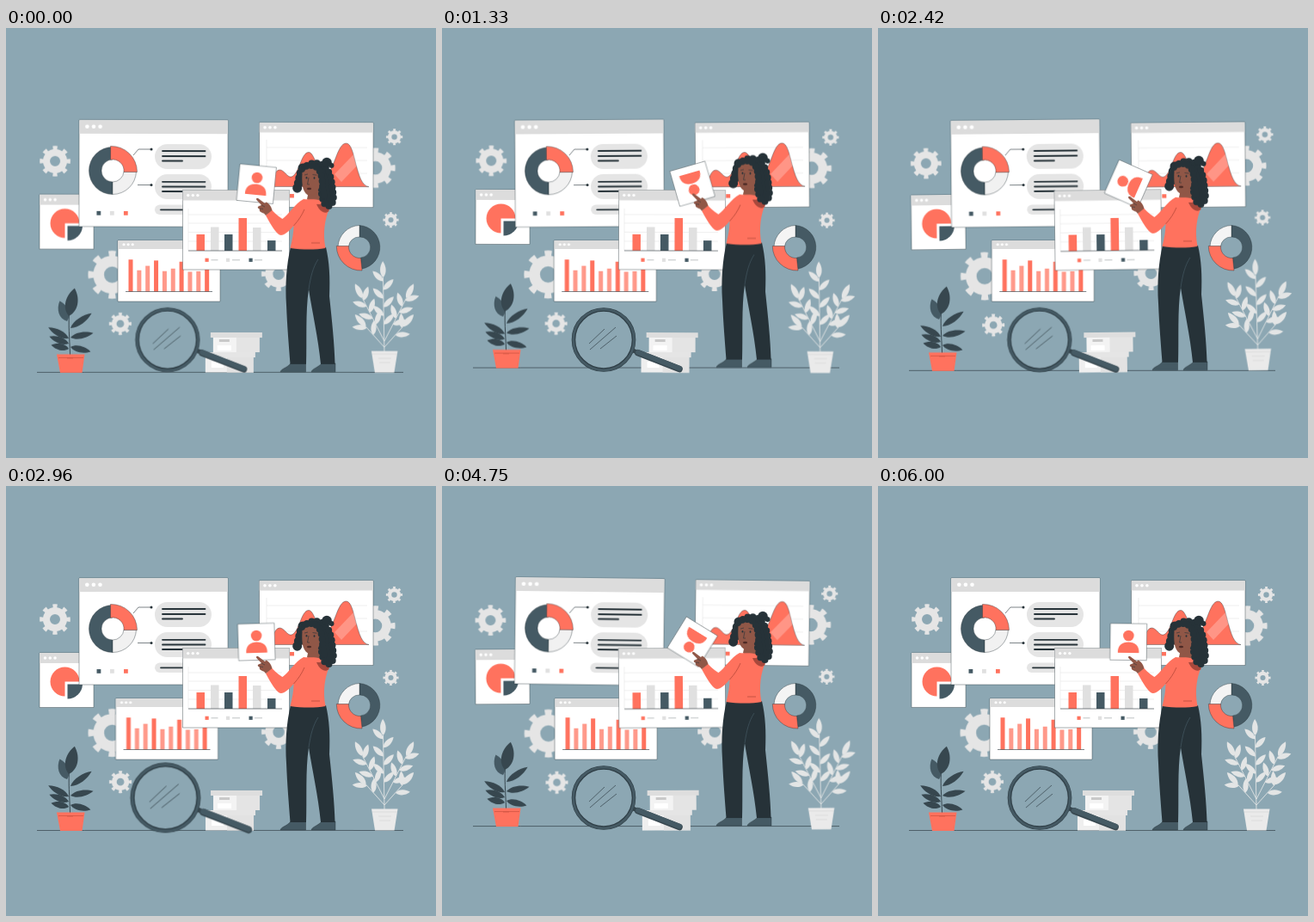
Write an HTML page that moves like this. It is 500x500 px and loops after 6040 ms.

```html
<!DOCTYPE html>
<html lang="en">
<head>
<meta charset="utf-8">
<title>Data dashboard</title>
<style>
  html, body { margin: 0; width: 100%; height: 100%; overflow: hidden; background: #8ca7b3; }
  svg { display: block; width: 100vw; height: 100vh; }

  .wind, .swing, .float, .spin, .shake, .pulse, .ends {
    transform-box: view-box;
    animation: wind 3.02s linear -45ms infinite;
  }
  .wind { transform-origin: 250px 250px; }
  .quick { animation-duration: 1.51s; }
  .float { animation-name: float; }
  .spin { animation-name: spin; transform-origin: 291.2px 181.2px; }
  .shake { animation-name: shake; animation-duration: 6.04s; }
  .pulse { animation-name: pulse; animation-duration: 6.04s; transform-origin: 215px 362.5px; }
  .ends { animation-name: ends; }

  @keyframes wind {
    0%, 100% { transform: rotate(0deg); }
    25% { transform: rotate(1deg); }
    75% { transform: rotate(-1deg); }
  }
  @keyframes float {
    0%, 100% { transform: translateY(0); }
    50% { transform: translateY(-6px); }
  }
  @keyframes spin { to { transform: rotate(360deg); } }
  @keyframes shake {
    0%, 100% { transform: translateX(0); }
    10%, 90% { transform: translateX(-.67px); }
    20%, 80% { transform: translateX(1.33px); }
    30%, 50%, 70% { transform: translateX(-2.67px); }
    40%, 60% { transform: translateX(2.67px); }
  }
  @keyframes pulse {
    0%, 20%, 40%, 60%, 100% { transform: scale(1); }
    10%, 50% { transform: scale(1.1); }
  }
  @keyframes ends {
    0%, 15% { opacity: 1; }
    15.01%, 45% { opacity: 0; }
    45.01%, 100% { opacity: 1; }
  }

  .red { fill: #ff725e; }
  .slate { fill: #455a64; }
  .dark { fill: #263238; }
  .grey { fill: #e0e0e0; }
  .bar { fill: #dcdcdc; }
  .white { fill: #fff; }
  .skin { fill: #905747; }
  .edge { stroke: #263238; stroke-width: .5; stroke-opacity: .8; }
  .line { fill: none; stroke: #263238; stroke-width: .6; }
  .grid { fill: none; stroke: #e4e4e4; stroke-width: .6; }
  .text { fill: none; stroke: #263238; stroke-width: 1.8; stroke-linecap: round; }
  .curly { stroke: #263238; stroke-width: 8; stroke-linecap: round; stroke-dasharray: 0 6; }
</style>
</head>
<body>
<svg viewBox="0 0 500 500">
  <defs>
    <g id="gear" fill="none" stroke="#e5e5e5">
      <circle r="10" stroke-width="8"/>
      <circle r="15" stroke-width="5.6" pathLength="16" stroke-dasharray=".85 1.15" stroke-dashoffset=".42"/>
    </g>
    <path id="leaf" d="M0 0C-.6 -.25 -.5 -.7 0 -1C.5 -.7 .6 -.25 0 0Z"/>
    <g id="dots" class="white"><circle r="1"/><circle cx="3.3" r="1"/><circle cx="6.6" r="1"/></g>
  </defs>

  <g class="wind">
    <use href="#gear" transform="translate(57 155)"/>
    <use href="#gear" transform="translate(123.500 287) scale(1.57)"/>
    <use href="#gear" transform="translate(429.500 162.500) scale(1.3)"/>
    <use href="#gear" transform="translate(317 286) scale(1.12)"/>
    <use href="#gear" transform="translate(451.500 126.500) scale(.54)"/>
    <use href="#gear" transform="translate(447.500 223) scale(.51)"/>
    <use href="#gear" transform="translate(133 344) scale(.73)"/>
  </g>

  <!-- pie window -->
  <g class="float"><g class="wind">
    <path class="white edge" d="M39 194H102V257.500H39Z"/>
    <path class="bar" d="M39 194H102V206H39Z"/>
    <use href="#dots" transform="translate(45.500 200) scale(1.75)"/>
    <path class="red" d="M68.500 227.500V244.500A17 17 0 1 1 85.500 227.500Z"/>
    <path class="slate" d="M71.500 230.500H89A17.500 17.500 0 0 1 71.500 247.500Z"/>
  </g></g>

  <!-- report window -->
  <g class="swing quick" style="transform-origin:171.500px 169px">
    <path class="white edge" d="M85 107H258V231H85Z"/>
    <path class="bar" d="M85.200 107.200H257.800V123H85.200Z"/>
    <use href="#dots" transform="translate(94.300 114.700) scale(2.3)"/>
    <path class="slate edge" d="M124 138.500A27.500 27.500 0 0 0 124 193.500V179A13 13 0 0 1 124 153Z"/>
    <path fill="#f1f1f1" class="edge" d="M124 193.500A27.500 27.500 0 0 0 151.500 167H137A13 13 0 0 1 124 179Z"/>
    <path class="red edge" d="M121.500 137.500A30 30 0 0 1 152.500 167.500H137A13 13 0 0 0 121.500 153.200Z"/>
    <path class="line" d="M148 148L154 141H168M153 182.500H168"/>
    <circle class="dark" cx="169" cy="141" r="1.500"/><circle class="dark" cx="169" cy="182.500" r="1.500"/>
    <g fill="#e5e5e5">
      <rect x="173" y="135" width="66" height="29" rx="14.500"/>
      <rect x="173" y="170" width="66" height="29" rx="14.500"/>
      <rect x="173" y="205.500" width="66" height="11.500" rx="5.700"/>
    </g>
    <path class="text" d="M182 143H231.500M182 149H231.500M182 154.500H205M182 178.800H231.500M182 184.500H231.500M182 190H205M180 211.300H220"/>
    <path class="slate" d="M105.500 213h4.800v4.800h-4.800z"/>
    <path class="grey" d="M121 213h4.800v4.800h-4.800z"/>
    <path class="red" d="M137 213h4.800v4.800h-4.800z"/>
  </g>

  <!-- trend window -->
  <g class="swing quick" style="transform-origin:360.500px 159px">
    <path class="white edge" d="M294.500 110H427V208.500H294.500Z"/>
    <path class="bar" d="M294.700 110.200H426.800V121.500H294.700Z"/>
    <use href="#dots" transform="translate(301 115.800) scale(1.8)"/>
    <path class="grid" d="M303 139H420M303 154H420M303 169H420M303 130V184"/>
    <path class="red edge" d="M303 184.500C309 184 311 165 318 165S328 178 335 171S344 144.500 352 144.500S364 178 372 172C382 165 385 134 395.500 134C407 134 406 183 422 184.500Z"/>
    <path fill="#fff" opacity=".25" d="M382 170L406 145L409 159L390 179Z"/>
    <path class="red" d="M330 193h5v4.500h-5z"/>
  </g>

  <!-- right donut -->
  <g class="edge">
    <path class="slate" d="M411 229.500A25.500 25.500 0 0 1 414 280L412.500 267A12 12 0 0 0 411 243Z"/>
    <path fill="#f4f4f4" d="M411 229.500A26 26 0 0 0 386 254H398.500A12 12 0 0 1 411 243Z"/>
    <path class="red" d="M384.300 253.500A28.500 28.500 0 0 0 414 282L412.500 267.500A13 13 0 0 1 398.500 253.500Z"/>
  </g>

  <!-- bar window -->
  <g class="shake">
    <path class="white edge" d="M130 247H249V318H130Z"/>
    <path class="bar" d="M130.200 247.200H248.800V257H130.200Z"/>
    <use href="#dots" transform="translate(137 251.800) scale(1.55)"/>
    <g id="bars" class="red"></g>
    <path class="line" d="M139 306.500H240"/>
  </g>

  <!-- column window -->
  <g class="swing" style="transform-origin:267.500px 234.500px">
    <path class="white edge" d="M205.500 188.500H329.500V281H205.500Z"/>
    <path class="bar" d="M205.700 188.700H329.300V200.500H205.700Z"/>
    <use href="#dots" transform="translate(211.700 194.600) scale(1.7)"/>
    <path class="grid" d="M212 217H321M212 227H321M212 237.500H321M212 248H321M212 210V259"/>
    <path class="red" d="M221.500 240h9.500v19h-9.500zM270.500 221h9.500v38h-9.500z"/>
    <path class="grey" d="M238 231.500h9.500V259h-9.500zM287 232h9.500v27H287z"/>
    <path class="slate" d="M254 240h9.500v19H254zM304 247h9.500v12H304z"/>
    <path class="line" d="M212 259H321"/>
    <path class="red" d="M231.500 267.700h4.200v4.200h-4.200z"/>
    <path class="grey" d="M256 267.700h4.200v4.200H256z"/>
    <path class="slate" d="M282.500 267.700h4.200v4.200h-4.200z"/>
    <path class="line" stroke-opacity=".5" d="M238.500 269.800h8M263 269.800h9M289 269.800h9"/>
  </g>

  <!-- ground -->
  <g class="float">
    <path class="line" d="M91.500 400.500H404"/>
    <path class="line ends" d="M36 400.500H91.500M404 400.500H462"/>
  </g>

  <!-- boxes -->
  <g class="wind">
    <path fill="#efefef" d="M232 377H288V400.500H232Z"/>
    <path fill="#e2e2e2" d="M257 383H288V400.500H257Z"/>
    <path fill="#e5e5e5" d="M231 377H290V383H231Z"/>
    <path fill="#f3f3f3" d="M241 359H269V377H241Z"/>
    <path fill="#e4e4e4" d="M268 359H295V377H268Z"/>
    <path fill="#dedede" d="M238 354H298V360H238Z"/>
    <path fill="#c9c9c9" d="M248 362h12v3h-12z"/>
    <path fill="#fff" d="M246 369h16v6h-16zM239 388h14v7h-14z"/>
  </g>

  <!-- magnifier -->
  <g class="pulse">
    <path d="M222 375L238 381.500" stroke="#37474f" stroke-width="5"/>
    <path d="M228 377.800L276 396.500" stroke="#37474f" stroke-width="7.600" stroke-linecap="round"/>
    <path d="M228 377L276 395.700" stroke="#455a64" stroke-width="6" stroke-linecap="round"/>
    <circle cx="188" cy="362.500" r="35" fill="#8ca7b3" stroke="#2f3e46" stroke-width="4.600"/>
    <circle cx="188" cy="362.500" r="35.300" fill="none" stroke="#455a64" stroke-width="2.800"/>
    <path class="line" d="M171 367L189 350M172 374L202 348M184 373L203 358"/>
  </g>

  <!-- right plant -->
  <g class="wind">
    <g id="pale" fill="#e3e5e5" stroke="#e3e5e5"></g>
    <path d="M425 375.500H455.500L451.500 400.500H429Z" fill="#eaeaea"/>
    <path class="grid" style="stroke:#d2d2d2" d="M426 379H455M433 384h15M434 389h13"/>
  </g>

  <!-- left plant -->
  <g class="float">
    <g id="dusk" fill="#37474f" stroke="#37474f"></g>
    <use href="#leaf" class="slate" transform="translate(71 341) rotate(-20) scale(14 25)"/>
    <use href="#leaf" fill="#37474f" transform="translate(73 335) rotate(12) scale(17 33)"/>
    <path class="red" d="M59 379.500H91.500L88.500 401H63Z"/>
    <path d="M61 383.500H90M71 384h7" fill="none" stroke="#c9513f" stroke-width=".7"/>
  </g>

  <!-- contact card -->
  <g class="spin">
    <path class="white edge" d="M270 160H312.500V202.500H270Z"/>
    <circle class="red" cx="291.300" cy="174" r="6.300"/>
    <path class="red" d="M279 194C278.500 185.500 284 181.500 291.300 181.500S304 185.500 303.500 194Z"/>
  </g>

  <!-- woman -->
  <g class="float">
    <path class="slate edge" d="M331 390H348.500V400H319C320 396 327 395.500 331 390ZM367 390H383V400H355C356 396 363 395 367 390Z"/>
    <path class="dark" d="M331 255C326 275 324.500 300 326 322C327 348 329 370 330.500 391H349C350 365 348 330 352 304C356 330 363 360 366 391H382.500C382 368 379 340 376 312C377 290 376 272 372 255Z"/>
    <path d="M352 304C354 290 357 278 363 269" fill="none" stroke="#455a64" stroke-width=".7"/>
    <path class="skin" d="M352 190L364 186L368 200L356 205L350 199Z"/>
    <path class="red" d="M346 199C356 200 368 196 376 210C371 222 368 238 371.500 256C360 258 345 258 330.500 256C333 246 334.500 238 334.500 230C327 239 321 243 317 240C311 235 306 225 302 218L309 211.500C314 217 318 220 321.500 222C329 217 336 204 346 199Z"/>
    <path d="M334.500 230C340 224 344 218 347 211M355 250h10" fill="none" stroke="#b84a3a" stroke-width=".8"/>
    <path fill="#a8483c" d="M361 205C365 214 371 217 375.500 213L376 205Z"/>
    <path class="skin" d="M302 218L309.500 212C308 207 306 204 302.500 202.500L301 204L293 198C291 197.500 290.500 199 291.500 200.300L297 206L293.500 207.500C292 208.500 293 210 294.500 210L295 213C297 215.500 300 214.500 302 218Z"/>
    <path class="line" style="stroke-width:.5" d="M297 206L301 208M294.500 210L299 210.500"/>
    <path class="dark curly" d="M350 160C355 156 365 156 370 161C378 168 379 180 380 190C382 200 380 205 376 207C370 206 369 203 368 197C365 188 368 178 360 166Z"/>
    <path class="curly" fill="none" style="stroke-width:11" d="M345 163C342 172 341 180 338 188"/>
    <circle class="dark" cx="373" cy="156.500" r="5.800"/>
    <circle class="dark" cx="378.500" cy="160" r="3"/>
    <path class="skin" d="M344.500 168C344 178 343.500 190 351 194.500C357 196.500 363 191 365 183L366 166C360 160 350 161 344.500 168Z"/>
    <path class="curly" fill="none" d="M344 164C349 159 359 158 364 165C369 174 367 184 370 196"/>
    <path class="line" d="M347 171l4 -1M356.500 170.500l5 .700M352 174L350.500 182H353"/>
    <ellipse class="dark" cx="349.500" cy="174.300" rx=".9" ry="1.300"/>
    <ellipse class="dark" cx="358.500" cy="174.500" rx=".9" ry="1.300"/>
    <ellipse cx="352.500" cy="187" rx="2.600" ry="1.200" fill="#4d2a25"/>
  </g>
</svg>

<script>
  const NS = "http://www.w3.org/2000/svg";
  const add = (id, tag, attrs) => {
    const el = document.createElementNS(NS, tag);
    for (const k in attrs) el.setAttribute(k, attrs[k]);
    document.getElementById(id).append(el);
  };

  // Bars rise and fall in a slowly sinking wave
  for (let i = 0; i < 10; i++) {
    const y = 275 + .6 * i - 7 * Math.cos(2 * Math.PI * (i + .3) / 3.1);
    add("bars", "rect", { x: 142.5 + i * 9.85, y, width: 5, height: 306.5 - y, opacity: i % 3 ? .72 : 1 });
  }

  const leaf = (id, x, y, turn, len, wide) =>
    add(id, "use", { href: "#leaf", stroke: "none", transform: `translate(${x} ${y}) rotate(${turn}) scale(${wide} ${len})` });

  // A straight twig with leaves on alternating sides and one at its tip
  function twig(id, x, y, turn, len, count) {
    const a = turn * Math.PI / 180, dx = Math.sin(a), dy = -Math.cos(a);
    add(id, "line", { x1: x, y1: y, x2: x + dx * len, y2: y + dy * len, "stroke-width": .9 });
    for (let i = 1; i <= count; i++) {
      const d = len * (.25 + .7 * i / count), side = i % 2 ? 1 : -1;
      leaf(id, x + dx * d, y + dy * d, turn + side * 45, 17, 7.5);
    }
    leaf(id, x + dx * len, y + dy * len, turn, 19, 8);
  }

  twig("pale", 440, 376, -1, 86, 6);
  for (const side of [-1, 1]) {
    twig("pale", 440, 364, side * 27, 56, 5);
    twig("pale", 440, 371, side * 42, 32, 2);
  }

  // Broad leaves pair up along the stem and droop towards the pot
  add("dusk", "path", { d: "M74.500 380C74 360 72 345 74 325", fill: "none" });
  for (let i = 0; i < 3; i++) {
    leaf("dusk", 75, 349 + 11 * i, 55 + 24 * i, 30 - 3 * i, 9);
    leaf("dusk", 73, 361 + 6 * i, -62 - 8 * i, 27 - 3 * i, 9);
  }
</script>
</body>
</html>
```
